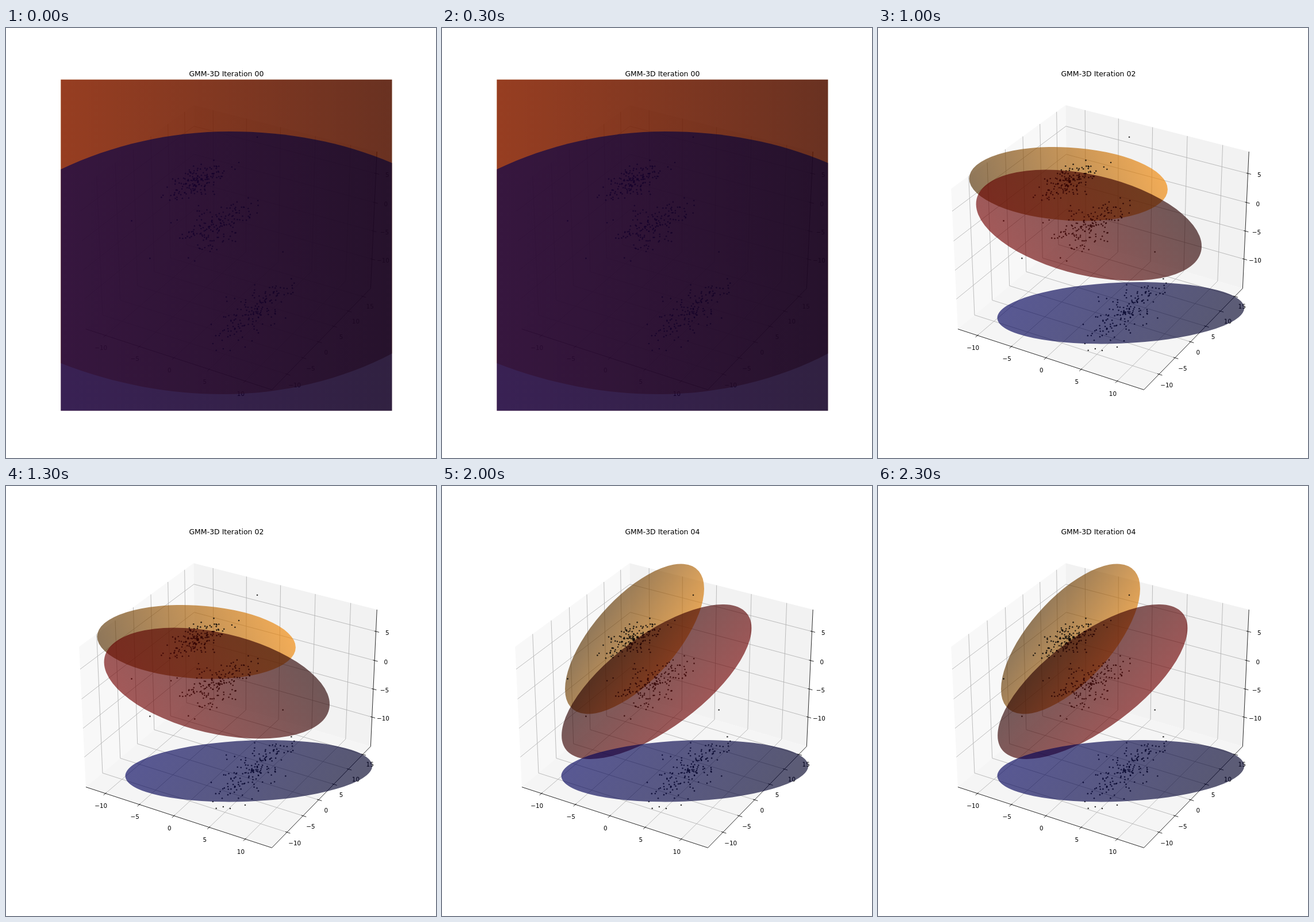
An HTML page with a canvas for the animation above (2500 ms loop, 748 by 748 pixels).

```html
<!DOCTYPE html>
<html lang="en">
<head>
<meta charset="utf-8">
<title>GMM-3D</title>
<style>
  html, body { margin: 0; width: 100%; height: 100%; overflow: hidden; background: #fff; }
  canvas { display: block; width: 748px; height: 748px; }
</style>
</head>
<body>
<canvas id="stage" width="748" height="748"></canvas>
<script>
const ctx = document.getElementById('stage').getContext('2d');
const STEP = 500, SIZE = 748;
const AXES = { x: 95.4, y: 89.8, w: 576, h: 576 };
const FONT = '"DejaVu Sans", sans-serif';
const NAVY = [0, 0, 128], RED = [139, 0, 0], ORANGE = [255, 140, 0];

// Data limits and box size of the plot.
const [X0, X1] = [-12.94, 13.64], [Y0, Y1] = [-14.6, 17.79], [Z0, Z1] = [-15.32, 8.69];
const WIDTH = X1 - X0, DEPTH = Y1 - Y0;
const XT = [-10, -5, 0, 5, 10], YT = [...XT, 15], ZT = [-10, -5, 0, 5];

// Perspective camera: elevation 30, azimuth -60, distance 10.
function project(px, py, pz) {
  const x = ((px - X0) / WIDTH - 0.5) * 1.1905;
  const y = ((py - Y0) / DEPTH - 0.5) * 1.1905;
  const z = ((pz - Z0) / (Z1 - Z0) - 0.5) * 0.8929;
  const s = 3113.5 / (10 - (0.433 * x - 0.75 * y + 0.5 * z));
  return [391.2 + s * (0.866 * x + 0.5 * y), 369.9 - s * (-0.25 * x + 0.433 * y + 0.866 * z)];
}

const circle = new Path2D();
circle.arc(0, 0, 1, 0, Math.PI * 2);

// Translucent surface, shaded between two brightness factors.
function surface(path, [ax, ay, bx, by], hue, from, to) {
  const fill = ctx.createLinearGradient(ax, ay, bx, by);
  [from, to].forEach((f, i) =>
    fill.addColorStop(i, `rgba(${hue.map(c => Math.round(c * f)).join()},0.64)`));
  return { path, fill };
}

// Ellipsoid outline from centre, half extents and correlation; shading follows the normals.
function blob(hue, from, to, cx, cy, w, h, r) {
  const q = Math.sqrt(1 - r * r), path = new Path2D();
  path.addPath(circle, new DOMMatrix([w, h * r, 0, h * q, cx, cy]));
  const gx = h, gy = -r * w, k = w * q * h / (gx * gx + gy * gy);
  return surface(path, [cx - k * gx, cy - k * gy, cx + k * gx, cy + k * gy], hue, from, to);
}

// Surface so large that only part of its outline is in view.
const sheet = (hue, from, to, d) => surface(new Path2D(d), [95, 0, 671, 0], hue, from, to);

const floor = blob(NAVY, 0.72, 0.3, 422.3, 495.7, 214.8, 53.7, -0.16);
const settled = [
  blob(ORANGE, 0.34, 0.88, 335, 266, 121, 130.5, -0.67),
  blob(RED, 0.28, 0.8, 373.3, 340.5, 165.2, 134.5, -0.695),
  floor
];
const SCENES = [
  [
    sheet(ORANGE, 0.88, 0.5, 'M95 583C190 620 285 637 378 637C480 637 585 612 672 566V89H95Z'),
    sheet(RED, 0.74, 0.48, 'M95 89H672V667H95Z'),
    sheet(NAVY, 0.62, 0.39, 'M95 246C185 203 287 180 389 180C490 180 585 198 672 235V667H95Z')
  ],
  [
    blob(ORANGE, 0.88, 0.4, 340.5, 279.5, 201.5, 86, 0.421),
    blob(NAVY, 0.75, 0.35, 419, 496.7, 207.5, 65.3, -0.082),
    blob(RED, 0.34, 0.88, 376.5, 350, 309.5, 291, 0.56)
  ],
  [
    blob(ORANGE, 0.32, 0.95, 331.2, 271.3, 172.7, 64.3, 0.146),
    blob(RED, 0.82, 0.28, 366.8, 343, 196.2, 96.5, 0.38),
    floor
  ],
  settled,
  settled
];

function trace(points) {
  ctx.beginPath();
  points.forEach(p => ctx.lineTo(...p));
}
function line(color, ...points) {
  trace(points);
  ctx.strokeStyle = color;
  ctx.stroke();
}
function face(color, ...points) {
  trace(points);
  ctx.fillStyle = color;
  ctx.fill();
}
function dot(x, y, r) {
  ctx.beginPath();
  ctx.arc(x, y, r, 0, Math.PI * 2);
  ctx.fill();
}

// Tick label, pushed away from the box centre in the directions given.
function label(value, p, px, py, pz) {
  const push = 0.04;
  const [x, y] = project(
    p[0] + px * push * WIDTH, p[1] + py * push * DEPTH, p[2] + pz * push * (Z1 - Z0));
  ctx.fillText(String(value).replace('-', '\u2212'), x, y + 8.6);
}

function drawBox() {
  const P = project, grid = '#b0b0b0', ink = '#000';
  const A = P(X0, Y0, Z0), B = P(X1, Y0, Z0), C = P(X1, Y1, Z0), D = P(X0, Y1, Z0);
  const E = P(X0, Y1, Z1), F = P(X1, Y1, Z1), G = P(X0, Y0, Z1);
  ctx.lineWidth = 0.83;
  face('#f8f8f8', A, D, E, G);
  face('#f2f2f2', D, C, F, E);
  face('#f5f5f5', A, B, C, D);

  XT.forEach(x => line(grid, P(x, Y0, Z0), P(x, Y1, Z0), P(x, Y1, Z1)));
  YT.forEach(y => line(grid, P(X1, y, Z0), P(X0, y, Z0), P(X0, y, Z1)));
  ZT.forEach(z => line(grid, P(X0, Y0, z), P(X0, Y1, z), P(X1, Y1, z)));
  line(ink, A, B, C, F);

  const dx = WIDTH / 120, dy = DEPTH / 120;
  ctx.fillStyle = ink;
  ctx.font = `10.39px ${FONT}`;
  XT.forEach(x => {
    line(ink, P(x, Y0 - 2 * dy, Z0), P(x, Y0 + dy, Z0));
    label(x, [x, Y0, Z0], 0, -1, -1);
  });
  YT.forEach(y => {
    line(ink, P(X1 - dx, y, Z0), P(X1 + 2 * dx, y, Z0));
    label(y, [X1, y, Z0], 1, 0, -1);
  });
  ZT.forEach(z => {
    line(ink, P(X1 - dx, Y1, z), P(X1 + 2 * dx, Y1, z));
    label(z, [X1, Y1, z], 1, 1, 0);
  });
}

// Seeded normal clouds in view coordinates.
function drawPoints(showMeans) {
  let seed = 11;
  const rand = () => (seed = (seed * 16807) % 2147483647) / 2147483647;
  const normal = () => Math.sqrt(-2 * Math.log(rand())) * Math.cos(2 * Math.PI * rand());
  function cloud(cx, cy, sx, sy, r) {
    for (let n = 0; n < 165; n++) {
      const a = normal(), b = normal();
      dot(cx + sx * a, cy + sy * (r * a + Math.sqrt(1 - r * r) * b), 1.3);
    }
    if (showMeans) dot(cx, cy, 2.4);
  }
  ctx.fillStyle = 'rgba(0,0,0,0.78)';
  cloud(333, 267, 28, 18, -0.66);
  cloud(370, 344, 33, 22, -0.62);
  cloud(428, 495, 36, 28, -0.7);
}

function draw(step) {
  ctx.fillStyle = '#fff';
  ctx.fillRect(0, 0, SIZE, SIZE);
  ctx.textAlign = 'center';
  drawBox();

  ctx.save();
  ctx.beginPath();
  ctx.rect(AXES.x, AXES.y, AXES.w, AXES.h);
  ctx.clip();
  SCENES[step].forEach(({ path, fill }, i) => {
    ctx.fillStyle = fill;
    ctx.fill(path);
    if (i === 0) drawPoints(step > 1); // the points lie above the rearmost surface
  });
  ctx.restore();

  ctx.fillStyle = '#000';
  ctx.font = `12.47px ${FONT}`;
  ctx.fillText(`GMM-3D Iteration 0${step}`, AXES.x + AXES.w / 2, 83.6);
}

const start = performance.now();
let shown = -1;
function tick() {
  const step = Math.floor((performance.now() - start) / STEP) % SCENES.length;
  if (step !== shown) draw(shown = step);
  requestAnimationFrame(tick);
}
tick();
</script>
</body>
</html>
```
